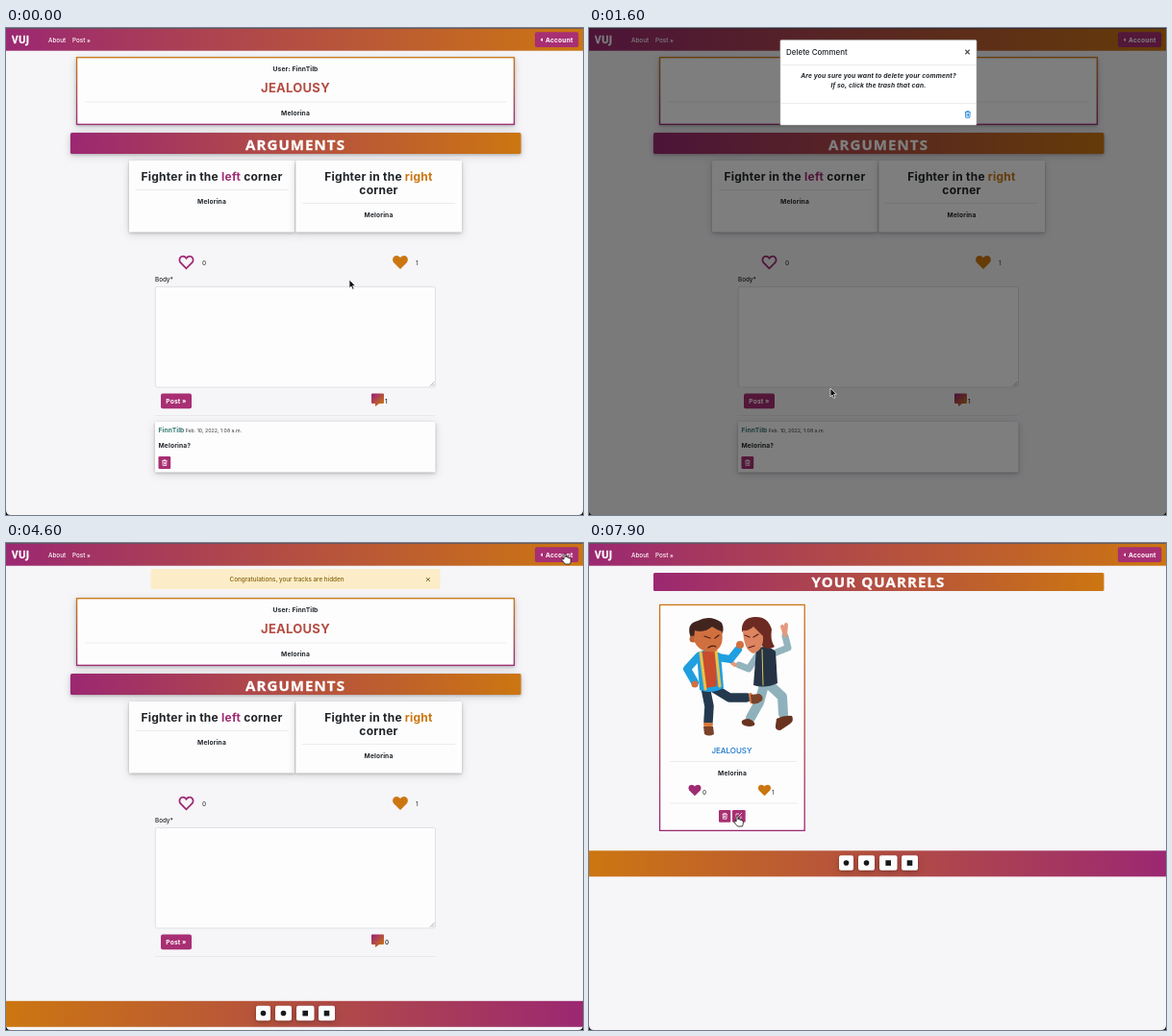
Write an HTML page that moves like this. It is 600x507 px and loops after 8000 ms.

```html
<!DOCTYPE html>
<html lang="en">
<head>
<meta charset="utf-8">
<title>Comment removal walkthrough</title>
<style>
  html, body { margin: 0; width: 100%; height: 100%; overflow: hidden; background: #111; }
  svg { display: block; width: 100vw; height: 100vh; }
  text { font: 500 6.3px Inter, "Open Sans", sans-serif; fill: #212529; }
  .b { font-weight: 700; font-size: 6.7px; letter-spacing: .02em; }
  .h { font-weight: 700; font-size: 12px; letter-spacing: .02em; }
  .topic { font-weight: 700; font-size: 13px; letter-spacing: .02em; fill: #b34d43; }
  .show { font: 700 15px "Open Sans", "Noto Sans", sans-serif; letter-spacing: 1.1px;
          stroke: #fff; stroke-width: .3px; stroke-linejoin: round; }
  .m { text-anchor: middle; }
  .w { fill: #fff; }
  .count { fill: #444; }
  .purple { fill: #9f2b73; }
  .orange { fill: #cc7611; }
  .btn { fill: #a82f73; }
  .card { fill: #fdfdfe; }
  .frame { fill: #fdfdfe; stroke: url(#fall); stroke-width: 1.3; }
  .card, .lift { filter: drop-shadow(0 1.7px 1.7px rgba(0, 0, 0, .22)) drop-shadow(0 2px 4px rgba(0, 0, 0, .14)); }
  .hr { fill: none; stroke: #e4e4e8; stroke-width: .7; }
  .icon { fill: none; stroke-width: .75; }
  .limb { fill: none; stroke-linecap: round; stroke-linejoin: round; }
  .status path { fill: #1c2b31; stroke: #48565b; stroke-width: .6; }
  .status text { font-size: 7.1px; fill: #eef3f4; }
</style>
</head>
<body>
<svg viewBox="0 0 600 507" preserveAspectRatio="none">
  <defs>
    <linearGradient id="warm"><stop stop-color="#9b2872"/><stop offset="1" stop-color="#cc7611"/></linearGradient>
    <linearGradient id="back"><stop stop-color="#cc7611"/><stop offset="1" stop-color="#9b2872"/></linearGradient>
    <linearGradient id="fall" x2="0" y2="1"><stop stop-color="#cc7611"/><stop offset="1" stop-color="#9b2872"/></linearGradient>
    <linearGradient id="diag" x2="1" y2="1"><stop offset=".1" stop-color="#9b2872"/><stop offset=".9" stop-color="#cc7611"/></linearGradient>
    <clipPath id="win"><path d="M0 0H600V502Q600 507 595 507H5Q0 507 0 502Z"/></clipPath>
    <path id="heart" d="M0 7L-7 0C-9-3-7.5-7-4-7C-2-7-.8-6 0-4.8C.8-6 2-7 4-7C7.5-7 9-3 7 0Z"/>
    <path id="trash" class="icon" d="M-2.6-2H2.6M-1-2V-2.9H1V-2M-2-2L-1.8 2.9H1.8L2-2M-.6-.8V1.8M.6-.8V1.8"/>
    <g id="footer">
      <rect width="600" height="27" fill="url(#back)"/>
      <g class="card">
        <rect x="260" y="5" width="15" height="15.5" rx="2"/>
        <rect x="280" y="5" width="17" height="15.5" rx="2"/>
        <rect x="302" y="5" width="18.5" height="15.5" rx="2"/>
        <rect x="325" y="5" width="17" height="15.5" rx="2"/>
      </g>
      <g fill="#16181b">
        <circle cx="267.5" cy="12.7" r="2.8"/>
        <circle cx="288.5" cy="12.7" r="2.8"/>
        <rect x="308.4" y="10" width="5.6" height="5.6"/>
        <rect x="330.7" y="10" width="5.6" height="5.6"/>
      </g>
    </g>
  </defs>

  <g clip-path="url(#win)">
    <rect width="600" height="507" fill="#f6f5f8"/>

    <g id="post">
      <g id="alert">
        <rect x="150.5" y="27" width="301" height="21" rx="2" fill="#fcedc8"/>
        <text class="m" x="292" y="40" style="fill:#85620c">Congratulations, your tracks are hidden</text>
        <path d="M437 36l4 4m0-4l-4 4" stroke="#8d7433"/>
      </g>
      <g id="main">
        <g class="lift"><rect class="frame" x="73.6" y="30.7" width="454.8" height="69.6"/></g>
        <text class="b m" x="301" y="45">User: FinnTilb</text>
        <text class="topic m" x="301" y="66.7">JEALOUSY</text>
        <path class="hr" d="M82 77H520"/>
        <text class="b m" x="301" y="91">Melorina</text>

        <rect class="lift" x="67" y="109" width="468.5" height="22" rx="1.5" fill="url(#warm)"/>
        <text class="show w m" x="301" y="126.5">ARGUMENTS</text>

        <rect class="card" x="128" y="138" width="172.5" height="74.5" rx="1"/>
        <rect class="card" x="301.3" y="138" width="172.7" height="74.5" rx="1"/>
        <text class="h m" x="214" y="159">Fighter in the <tspan class="purple">left</tspan> corner</text>
        <path class="hr" d="M135 168.5H294M308 182.5H467"/>
        <text class="b m" x="214" y="182.7">Melorina</text>
        <text class="h m" x="387.5" y="159">Fighter in the <tspan class="orange">right</tspan></text>
        <text class="h m" x="387.5" y="172.7">corner</text>
        <text class="b m" x="387.5" y="196.7">Melorina</text>

        <use href="#heart" transform="translate(187.5 244) scale(.9)" fill="none" stroke="#9f2b73" stroke-width="2"/>
        <text class="count" x="204" y="246.5">0</text>
        <use href="#heart" class="orange" transform="translate(410 244)"/>
        <text class="count" x="426" y="246.5">1</text>

        <text x="155" y="264">Body*</text>
        <rect x="155.3" y="269.4" width="291.2" height="104.6" rx="2" fill="#fdfdfe" stroke="#d3d6db" stroke-width=".7"/>
        <path d="M441 372.8l4.5-4.5m-2 4.5l2-2" stroke="#777" stroke-width=".6"/>
        <rect class="btn" x="161" y="380.5" width="32" height="15.7" rx="2"/>
        <text class="b w m" x="177" y="390.8">Post »</text>
        <path d="M381 380.5H392Q393 380.5 393 381.5V390Q393 391 392 391H388L384 394V391H381Q380 391 380 390V381.5Q380 380.5 381 380.5Z" fill="url(#diag)"/>
        <text id="total" x="394" y="391"></text>
        <path class="hr" d="M155 403.5H447"/>
      </g>
      <g id="comment">
        <rect class="card" x="155" y="410" width="291.5" height="52.5" rx="1"/>
        <text class="b" x="158.5" y="421" style="fill:#377873">FinnTilb</text>
        <text x="186.7" y="421" style="font-size:5.2px;fill:#555">Feb. 10, 2022, 1:08 a.m.</text>
        <text class="b" x="158.5" y="437">Melorina?</text>
        <rect class="btn" x="158.5" y="446" width="12.7" height="13" rx="1.2"/>
        <use href="#trash" x="164.9" y="452.6" stroke="#fff"/>
      </g>
      <use id="foot" href="#footer" y="476.8"/>
    </g>

    <g id="profile">
      <rect x="67" y="31" width="468.5" height="19" rx="1.5" fill="url(#warm)"/>
      <text class="show w m" x="301" y="45.7">YOUR QUARRELS</text>
      <rect class="frame" x="73.6" y="64.4" width="150.6" height="235"/>

      <g id="right-boy">
        <path class="limb" d="M182 148L177 166L168 182M188 148L201 160L202 178" stroke="#8fb1bb" stroke-width="10"/>
        <path d="M159 185q7-5 13 2q2 4-6 4q-9-1-7-6ZM195 183q8-4 16-3q3 5-3 9l-9 6q-6 0-5-5Z" fill="#69341f"/>
        <path class="limb" d="M192 115L207 109L204 97" stroke="#93b3bd" stroke-width="7"/>
        <path class="limb" d="M176 116L166 131L156 127" stroke="#93b3bd" stroke-width="7"/>
        <path class="limb" d="M204 96L201 87M204 96L205 85M152 127l-3-2" stroke="#e59a7c" stroke-width="4"/>
        <path d="M174 110Q185 105 194 113L196 146Q183 152 171 148Z" fill="#253344"/>
        <path class="limb" d="M180 111L181 148" stroke="#ddc55d"/>
        <path d="M159 92Q158 78 172 77Q186 76 190 90Q188 101 193 108Q184 113 178 105Z" fill="#6d2a22"/>
        <path d="M160 91Q166 92 171 87Q176 92 181 97Q182 111 171 115Q161 112 160 91Z" fill="#dd8460"/>
        <path class="limb" d="M162 96l5 2m4 0l5-3M166 109l6-2" stroke="#5b211e" stroke-width="1.3"/>
      </g>
      <g id="left-boy">
        <path class="limb" d="M121 150L125 170L124 186M128 150L146 161L164 161" stroke="#24394d" stroke-width="9.5"/>
        <path class="limb" d="M121 189H127M168 158L169 165" stroke="#d9783a" stroke-width="4"/>
        <path d="M119 191h10l1 8q-5 3-10 0ZM168 158l9-1q5 2 3 7q-6 5-11 3Z" fill="#7a432a"/>
        <path class="limb" d="M114 118L102 131L110 145" stroke="#1f9fe0" stroke-width="8"/>
        <path class="limb" d="M134 119L147 121L155 111" stroke="#1f9fe0" stroke-width="8"/>
        <circle cx="157" cy="106" r="4" fill="#d0703f"/>
        <circle cx="110" cy="147" r="3.5" fill="#d0703f"/>
        <path d="M112 114Q125 109 137 115L140 151Q127 158 115 153Z" fill="#1f9fe0"/>
        <path d="M118 113L131 112L133 149L121 151Z" fill="#c94c2c"/>
        <path class="limb" d="M116 114L121 152M132 112L136 149" stroke="#efc042" stroke-width="3"/>
        <path d="M106 99Q100 84 113 81Q126 74 138 83Q142 91 136 98Z" fill="#42241f"/>
        <circle cx="108" cy="100" r="3.5" fill="#bd6238"/>
        <path d="M110 91Q120 94 128 87Q134 91 138 92Q141 107 131 113Q114 115 109 101Z" fill="#d0703f"/>
        <path class="limb" d="M120 97l6 2m5 0l4-3M124 109q4-3 8-1" stroke="#4c1f1a" stroke-width="1.3"/>
      </g>

      <text class="m" x="148.5" y="219" style="font-size:8px;fill:#1673c6">JEALOUSY</text>
      <path class="hr" d="M84 227.5H216M84 271H216"/>
      <text class="b m" x="149" y="241.7">Melorina</text>
      <use href="#heart" class="purple" transform="translate(110 257.5) scale(.83)"/>
      <text class="count" x="118" y="262">0</text>
      <use href="#heart" class="orange" transform="translate(182.5 257.5) scale(.83)"/>
      <text class="count" x="190" y="262">1</text>
      <rect class="btn" x="135" y="278" width="12.3" height="12.7" rx="1.2"/>
      <use href="#trash" x="141.2" y="284.3" stroke="#fff"/>
      <rect class="btn" x="149" y="278" width="13.7" height="12.7" rx="1.2"/>
      <path class="icon" d="M156 282h-3v5h5v-2.5M155 285l4-4" stroke="#fff"/>
      <use href="#footer" y="320.3"/>
    </g>

    <g id="nav">
      <rect width="600" height="23.7" fill="url(#warm)"/>
      <path d="M0 .4H600" stroke="#5c5560" stroke-width=".9"/>
      <text class="show w" x="6" y="16" style="font-size:10px;letter-spacing:.4px">VUJ</text>
      <text class="w" x="44" y="14.8">About</text>
      <text class="w" x="69" y="14.8">Post »</text>
      <rect class="btn" x="550" y="4.3" width="45.3" height="15.7" rx="2"/>
      <path d="M558 10.2v4l-2.2-2Z" fill="#fff"/>
      <text class="b w" x="561" y="14.5">Account</text>
    </g>

    <g id="menu">
      <rect x="471" y="5" width="79" height="66" rx="1.5" fill="#fff" stroke="#cfcdd2" stroke-width=".7"/>
      <rect id="hover" x="471.4" y="8.5" width="78.2" height="12.8" fill="#eeeef1"/>
      <path class="hr" d="M471.5 25.5H549.5"/>
      <text x="481" y="17">My Posts</text>
      <text x="481" y="37.5">Deactivate Account</text>
      <text x="481" y="50.5">Delete Account</text>
      <text x="481" y="63.5">Logout</text>
    </g>

    <rect id="shade" width="600" height="507"/>
    <g id="modal">
      <rect x="198.7" y="12.3" width="204.5" height="89" rx="1.5" fill="#fff" stroke="#666" stroke-width=".5"/>
      <text x="205" y="28.3" style="font-size:8px">Delete Comment</text>
      <path d="M391.3 22.8l4.4 4.4m0-4.4l-4.4 4.4" stroke="#555" stroke-width="1.3"/>
      <path class="hr" d="M199 38.5H403M199 78.5H403"/>
      <text class="b m" x="301" y="52" style="font-style:italic">Are you sure you want to delete your comment?</text>
      <text class="b m" x="301" y="62" style="font-style:italic">If so, click the trash that can.</text>
      <use href="#trash" transform="translate(393.8 90) scale(1.15)" stroke="#1b83dc"/>
    </g>
  </g>

  <g id="deleteLink" class="status">
    <path d="M0 493.5H92Q95 493.5 95 496.5V507H0Z"/>
    <text x="2" y="503">site.test:7040/remove/58</text>
  </g>
  <g id="profileLink" class="status">
    <path d="M0 493.5H99Q102 493.5 102 496.5V507H0Z"/>
    <text x="2" y="503">site.test:7040/%2Fmyposts/</text>
  </g>

  <g id="cursor" stroke-linejoin="round">
    <path id="arrow" d="M0 0V8.8L2 7L3.5 10.3L5 9.6L3.6 6.4H6.3Z" fill="#111" stroke="#fff" stroke-width=".7"/>
    <path id="hand" d="M-.9 6V1Q-.9 0 0 0Q1 0 1 1V4Q2 0 2.9 4.3Q4.2 3.5 4.7 4.9Q6.3 4.3 6.3 6V8Q6.2 9.5 5.2 11H.5Q-.6 9.5-3 7Q-3.4 5.6-2.2 5.6Z" fill="#fff" stroke="#111" stroke-width=".8"/>
  </g>
</svg>
<script>
  const LOOP = 8000, STEP = 100;
  const REMOVED = 3000, MENU = 4800, PROFILE = 6700;

  const $ = id => document.getElementById(id);
  const show = (id, on) => { $(id).style.display = on ? "" : "none"; };
  const move = (id, x, y) => $(id).setAttribute("transform", `translate(${x} ${y})`);
  const part = (t, from, length) => Math.min(1, Math.max(0, (t - from) / length));
  const within = (t, ...spans) => spans.some(([a, b]) => t >= a && t < b);

  const ease = {
    both: p => p * p * (3 - 2 * p),
    start: p => p * p,
    end: p => 1 - (1 - p) ** 2
  };

  // time, x, y, easing towards this point
  const path = [
    [0, 357, 262], [900, 164, 447, "both"], [1250, 164, 447],
    [1600, 251, 375, "start"], [2300, 392, 86, "end"], [3600, 392, 86],
    [4400, 581, 11, "both"], [5000, 581, 11], [5600, 514, 13, "both"],
    [6900, 514, 13], [7800, 154, 284, "both"], [LOOP, 154, 284]
  ];

  function cursorAt(t) {
    const i = path.findIndex(k => k[0] > t);
    const [t0, x0, y0] = path[i - 1], [t1, x1, y1, kind = "both"] = path[i];
    const p = ease[kind]((t - t0) / (t1 - t0));
    return [x0 + (x1 - x0) * p, y0 + (y1 - y0) * p];
  }

  function draw(t) {
    const removed = t >= REMOVED, profile = t >= PROFILE;
    show("post", !profile);
    show("profile", profile);
    show("alert", removed);
    show("foot", removed);
    show("comment", !removed);
    move("main", 0, removed ? 27 : 0);
    $("total").textContent = removed ? 0 : 1;

    // backdrop fades first, then the dialog slides down
    $("shade").style.opacity = removed ? 0 : .5 * part(t, 1030, 150);
    const drop = ease.end(part(t, 1150, 300));
    show("modal", !removed && drop > 0);
    $("modal").style.opacity = drop;
    move("modal", 0, -21 * (1 - drop));

    show("menu", t >= MENU && !profile);
    show("hover", t >= 5500);
    show("deleteLink", within(t, [2300, 3700]));
    show("profileLink", within(t, [5600, 6900]));

    const hand = within(t, [2200, 3700], [4200, 7000], [7700, LOOP]);
    show("hand", hand);
    show("arrow", !hand);
    move("cursor", ...cursorAt(t));
  }

  const begin = performance.now();
  function tick() {
    const t = (performance.now() - begin) % LOOP;
    draw(Math.floor(t / STEP) * STEP);
    requestAnimationFrame(tick);
  }
  tick();
</script>
</body>
</html>
```
